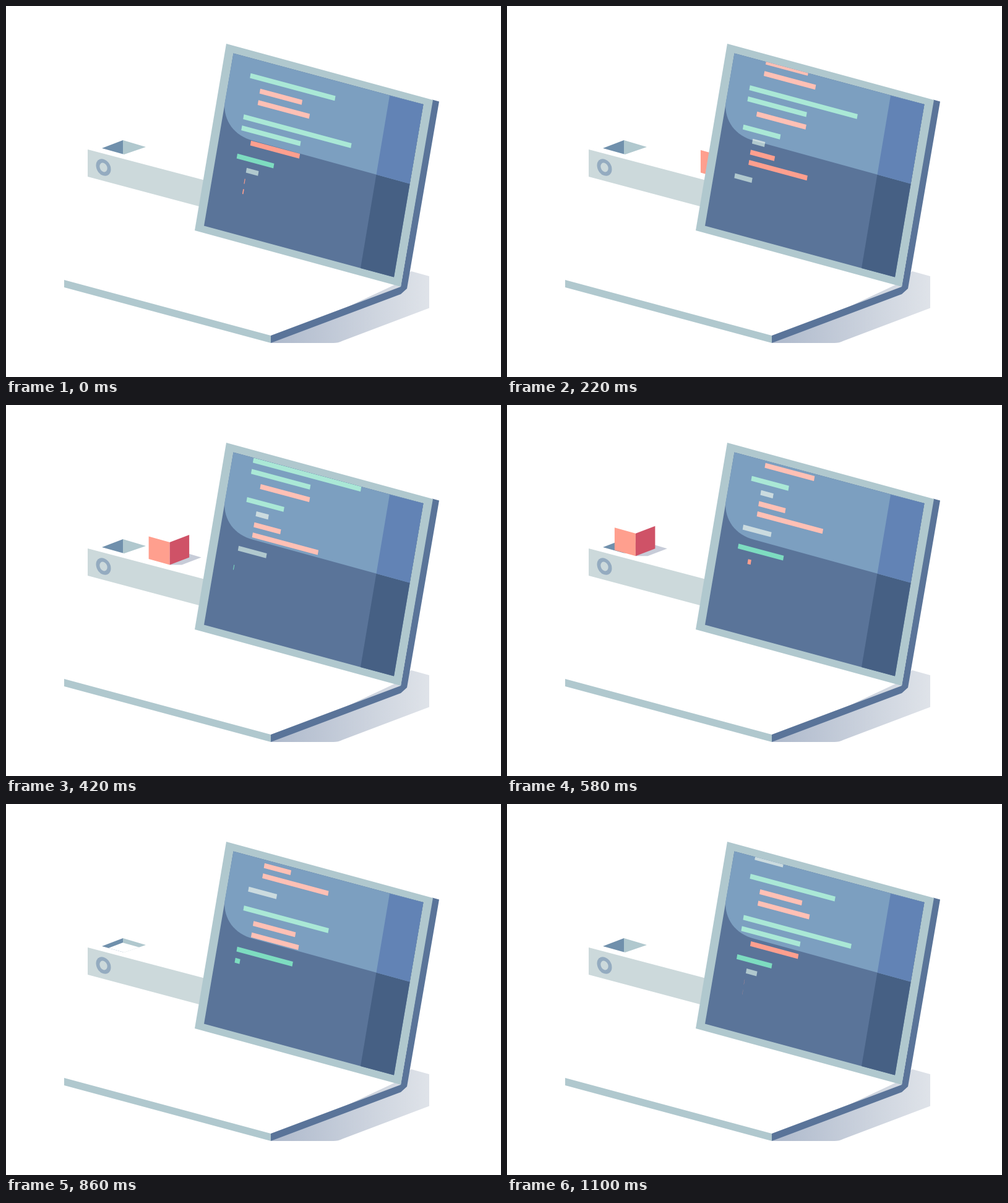
An HTML page with a canvas that plays this animation: 800 px wide and 600 px high, repeating every 1120 ms.

```html
<!DOCTYPE html>
<html>
<head>
<meta charset="utf-8">
<style>
html, body { margin: 0; height: 100%; overflow: hidden; background: #fff; }
canvas { display: block; }
</style>
</head>
<body>
<canvas id="stage" width="800" height="600"></canvas>
<script>
const ctx = document.getElementById('stage').getContext('2d');
const LOOP = 1120;
const MINT = '#7ddcc0', CORAL = '#ff9f8e', PALE = '#b0c8ce', BLUE = '#5a7499';

// Code lines: colour, place at the end of the loop, full width, typing start and duration
const lines = [
  [MINT, 395.5, 109, 137, 400, 350],
  [CORAL, 411, 134, 68, 524, 294],
  [CORAL, 408, 152.5, 83, 614, 310],
  [MINT, 384.5, 175.5, 174, 689, 338],
  [MINT, 381.5, 193.5, 95, 796, 320],
  [CORAL, 396, 218, 79.5, 870, 264],
  [MINT, 374, 239, 60, 940, 195],
  [PALE, 389, 262, 20, 1000, 137],
  [CORAL, 385.7, 279.8, 43, 1085, 325],
  [CORAL, 383.2, 296.3, 106, 1093, 324],
  [PALE, 360.3, 317.8, 45.5, 1158, 325]
];

const screen = new Path2D('M367.5 76.5 L674.5 159 L627 438.5 L320 355.5Z');
const glare = new Path2D('M367.5 76.5 L674.5 159 L652.5 287.5 L400 218 C368 210 352 185 353.3 158Z');
const column = new Path2D('M620 145 L674.5 159 L627 438.5 L573 424Z');

// Quadratic ease-in-out
function ease(t, start, duration) {
  const p = Math.min(1, Math.max(0, (t - start) / duration));
  return p < .5 ? 2 * p * p : 1 - 2 * (1 - p) ** 2;
}

function shape(color, path) {
  ctx.fillStyle = color;
  ctx.fill(typeof path === 'string' ? new Path2D(path) : path);
}

function clipped(path, draw) {
  ctx.save();
  ctx.clip(path);
  draw();
  ctx.restore();
}

function gradient(x0, c0, x1, c1) {
  const g = ctx.createLinearGradient(x0, 0, x1, 0);
  g.addColorStop(0, c0);
  g.addColorStop(1, c1);
  return g;
}

const floorShade = gradient(440, '#b0bbcd', 684, '#dfe3e9');
const cubeShade = gradient(180, '#c7ccd8', 320, '#b4bccd');

function ring(color, rx, ry) {
  ctx.save();
  ctx.transform(1, .268, 0, 1, 157.5, 261);
  ctx.beginPath();
  ctx.ellipse(0, 0, rx, ry, 0, 0, 7);
  ctx.fillStyle = color;
  ctx.fill();
  ctx.restore();
}

function cubeAndSlot(t) {
  const left = 178 * (1 - ease(t, 53, 675));
  const sink = 75 * ease(t, 728, 250);
  const reach = 19.5 * Math.max(0, 1 - sink / 36);

  if (reach) {
    ctx.save();
    ctx.translate(157 + left, 194 + left * .25);
    shape(cubeShade, `M34 46 h${reach} L${65.5 + reach} 34 L${31.5 + reach} 24Z`);
    ctx.restore();
  }

  shape('#7090ac', 'M155 230 L189 217 V239.5Z');
  shape(PALE, 'M189 217 L226 228 L191 240 L189 239.5Z');

  ctx.save();
  if (sink) ctx.clip(new Path2D('M155 100 H226 V228 L191 240 L155 230Z'));
  ctx.translate(157 + left, 194 + left * .25 + sink);
  shape('#fff', 'M0 0 L31.5 -12 L65.5 -2.5 L34 9.5Z');
  shape(CORAL, 'M0 0 L34 9.5 V46 L0 36.5Z');
  shape('#cf5267', 'M34 9.5 L65.5 -2.5 V34 L34 46Z');
  ctx.restore();
}

function typeLines(t, tint) {
  for (const turn of [0, 1]) {
    for (const [color, x, y, width, start, duration] of lines) {
      const w = width * ease(t + turn * LOOP, start, duration);
      if (!w) continue;
      ctx.save();
      ctx.transform(1, .268, -.17, 1,
        x + .0375 * t + (turn - 1) * 43,
        y - .2138 * t - (turn - 1) * 239.4);
      ctx.fillStyle = tint || color;
      ctx.fillRect(0, 0, w, 7.8);
      ctx.restore();
    }
  }
}

function laptop(t) {
  shape(floorShade, 'M428 545 H529 Q537 545 544 541.5 L684 488.5 V437 L655 429 L630 450Z');
  shape(PALE, 'M94 443 L428 533 V545 L94 455Z');
  shape(BLUE, 'M689 151.5 L700 154.5 L648 457 L638 466 L428 545 V533 L638 454Z');
  shape(PALE, 'M356 61 L690 152 L638 454 L305 363Z');
  shape(BLUE, screen);
  shape('#466084', column);
  shape('#7c9fc0', glare);
  clipped(glare, () => shape('#6283b5', column));
  clipped(screen, () => typeLines(t));
  clipped(glare, () => typeLines(t, 'rgba(255,255,255,.34)'));
}

function frame(now) {
  const t = now % LOOP;
  ctx.fillStyle = '#fff';
  ctx.fillRect(0, 0, 800, 600);
  shape('#ccd9db', 'M132 232 L320 281.5 L312 324 L132 276Z');
  ring('#94abc0', 12, 13.3);
  ring('#ccd9db', 6.2, 7.2);
  cubeAndSlot(t);
  laptop(t);
  requestAnimationFrame(frame);
}
requestAnimationFrame(frame);
</script>
</body>
</html>
```
